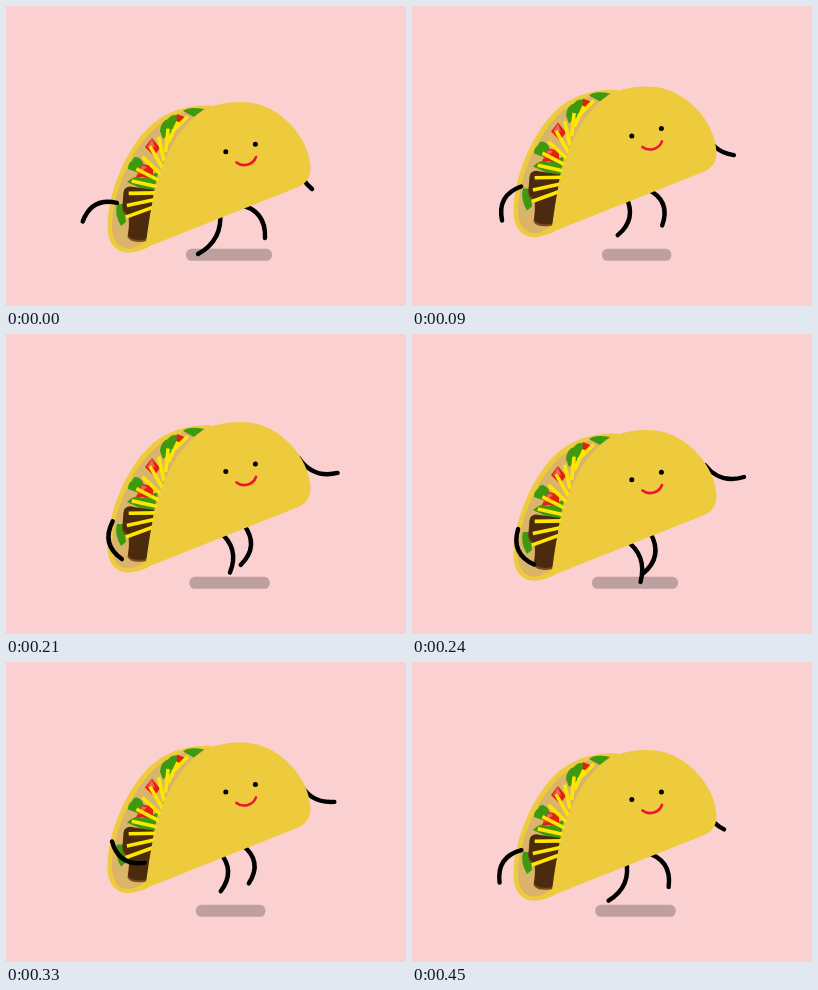
An HTML page with a canvas that plays this animation: 400 by 300 pixels, repeating every 0.48 s.

```html
<!DOCTYPE html>
<html lang="en">
<head>
<meta charset="utf-8">
<title>Walking taco</title>
<style>
  html, body { margin: 0; width: 100%; height: 100%; overflow: hidden; background: #fbd0d0; }
  canvas { display: block; width: 400px; height: 300px; }
</style>
</head>
<body>
<canvas id="stage" width="400" height="300"></canvas>
<script>
const ctx = document.getElementById('stage').getContext('2d');
const STEP_MS = 30, STEPS = 16;
const C = {
  sky: '#fbd0d0', shadow: '#bfa0a0', shell: '#edcb3c', inside: '#dbb46c',
  bean: '#4b2a0d', beanEdge: '#7a4a1b', leaf: '#3d990d', tomato: '#e2210f',
  tomatoLight: '#f2605a', cheese: '#ffe600', ink: '#000', mouth: '#ee1238'
};

// Outlines at the lowest point of the bounce.
const backShell = new Path2D('M206 99.5 C182 98.5 159 105 142 122 C121 143 101.5 185 101.5 221 ' +
  'C101.5 238 111 248 125 246.5 Q133 245.5 142 241.5 L206 140 Z');
const backInside = new Path2D('M203 103 C181 102.5 161 110 145 126 C125 146 106 188 106 220 ' +
  'C106 236 114 244 125 242.5 Q133 241 143 232 L203 130 Z');
const frontShell = new Path2D('M139 242 C142 226 143 210 147 196 C154 161 165 135 182 117 ' +
  'C197 101 214 96 236 96 C273 96 304.5 132 304.5 163 C304.5 172 299 178.5 291 181.500 Z');
const smile = new Path2D('M230.500 156.500 C236 161 246.500 160 250 151');
const beans = new Path2D('M118 184 Q121 179 128 181 L148 184 L141 233 ' +
  'Q126 236 122 229 Q124 218 123 209 Q115 206 117 196 Z');
const leaves = new Path2D('M111 198 Q108 208 115 220 L120 216 L118 198 Z ' +
  'M122 163 Q122 157 126 155 Q128 149 133 152 Q138 154 138 163 L136 168 Z ' +
  'M121 176 Q130 168 136 172 L152 166 L148 186 L134 182 Z ' +
  'M154 125 Q155 115 162 113 Q166 107 174 110 L168 124 L157 133 Z ' +
  'M177 105 Q183 100 198 103 L188 111 Z');
const tomatoes = new Path2D('M130 171 L136 158 L147 160 L147 171 Z ' +
  'M139 141 L146 132 L154 142 L148 150 Z M171 108 L181 112 L170 122 Z');
const tomatoShine = new Path2D('M132 169 L136 159 L141 161 Z M141 141 L146 133 L149 141 Z');

const lerp = (a, b, t) => a + (b - a) * t;
const rad = deg => deg * Math.PI / 180;

function fill(path, color) {
  ctx.fillStyle = color;
  ctx.fill(path);
}

function dot(x, y, r) {
  ctx.fillStyle = C.ink;
  ctx.beginPath();
  ctx.arc(x, y, r, 0, Math.PI * 2);
  ctx.fill();
}

// A bent stroke; bend pushes the control point sideways from the chord.
function limb(x0, y0, x1, y1, bend) {
  const dx = x1 - x0, dy = y1 - y0, k = bend / Math.hypot(dx, dy);
  ctx.strokeStyle = C.ink;
  ctx.lineWidth = 4.4;
  ctx.beginPath();
  ctx.moveTo(x0, y0);
  ctx.quadraticCurveTo((x0 + x1) / 2 + dy * k, (y0 + y1) / 2 - dx * k, x1, y1);
  ctx.stroke();
}

// Strands fan out along the curved opening, flat at the bottom and steep at the top.
function drawCheese() {
  const count = 11;
  ctx.strokeStyle = C.cheese;
  ctx.lineWidth = 3.6;
  ctx.lineCap = 'butt';
  ctx.beginPath();
  for (let i = 0; i < count; i++) {
    const t = i / (count - 1);
    const x = lerp(lerp(134, 138, t), lerp(138, 174, t), t);
    const y = lerp(lerp(206, 158, t), lerp(158, 118, t), t);
    const angle = rad(-20 + 155 * t ** 1.3), half = lerp(15, 11, t);
    const dx = half * Math.cos(angle), dy = half * Math.sin(angle);
    ctx.moveTo(x - dx, y - dy);
    ctx.lineTo(x + dx, y + dy);
  }
  ctx.stroke();
  ctx.lineCap = 'round';
}

function drawBody() {
  fill(backShell, C.shell);
  fill(backInside, C.inside);
  fill(leaves, C.leaf);
  fill(tomatoes, C.tomato);
  fill(tomatoShine, C.tomatoLight);
  ctx.save();
  ctx.translate(-0.5, 2);
  fill(beans, C.beanEdge);
  ctx.restore();
  fill(beans, C.bean);
  drawCheese();
  fill(frontShell, C.shell);
  dot(219.8, 145.7, 2.5);
  dot(249.4, 138.2, 2.5);
  ctx.strokeStyle = C.mouth;
  ctx.lineWidth = 2.6;
  ctx.stroke(smile);
}

// Slow linear sweep inwards, then a quick return.
function drawLeftArm(step) {
  const turn = 11.5, outer = 61.5, inner = -62;
  const t = step < turn ? step / turn : (STEPS - step) / (STEPS - turn);
  const deg = lerp(outer, inner, t), a = rad(deg);
  const out = Math.max(0, (deg + 26) / 87.5);
  const x = lerp(106, 111, out), y = lerp(195, 196.8, out);
  limb(x, y, x - 39 * Math.sin(a), y + 39 * Math.cos(a), -17);
}

function drawHiddenLimbs(u) {
  limb(293, 141 - 10 * u, 306 + 26 * (1 - (1 - u) ** 2), 183 - 40 * u ** 0.8, -14);
  limb(214 - u, 205.5, 192 + 36.5 * u, 248 - 3.5 * Math.sin(Math.PI * u), 16);
  limb(233 + 5 * u, 198.5, 259 - 28.5 * u ** 1.2, 232 + 8 * u, 18);
}

function draw(step) {
  const swing = Math.min(step, STEPS - step) / 8;
  const hop = 1 - Math.abs(step % 8 - 4) / 4;
  const lift = 16.2 * (1 - (1 - hop) ** 2.4);

  ctx.fillStyle = C.sky;
  ctx.fillRect(0, 0, 400, 300);
  ctx.fillStyle = C.shadow;
  ctx.beginPath();
  ctx.roundRect(180 + 13.2 * hop, 242.8, 86 - 22 * hop, 12, 5.5);
  ctx.fill();

  ctx.save();
  ctx.translate(0, -lift);
  ctx.lineCap = 'round';
  drawHiddenLimbs(swing);
  drawBody();
  drawLeftArm(step);
  ctx.restore();
}

function tick() {
  draw(Math.floor(performance.now() / STEP_MS) % STEPS);
  requestAnimationFrame(tick);
}
tick();
</script>
</body>
</html>
```
